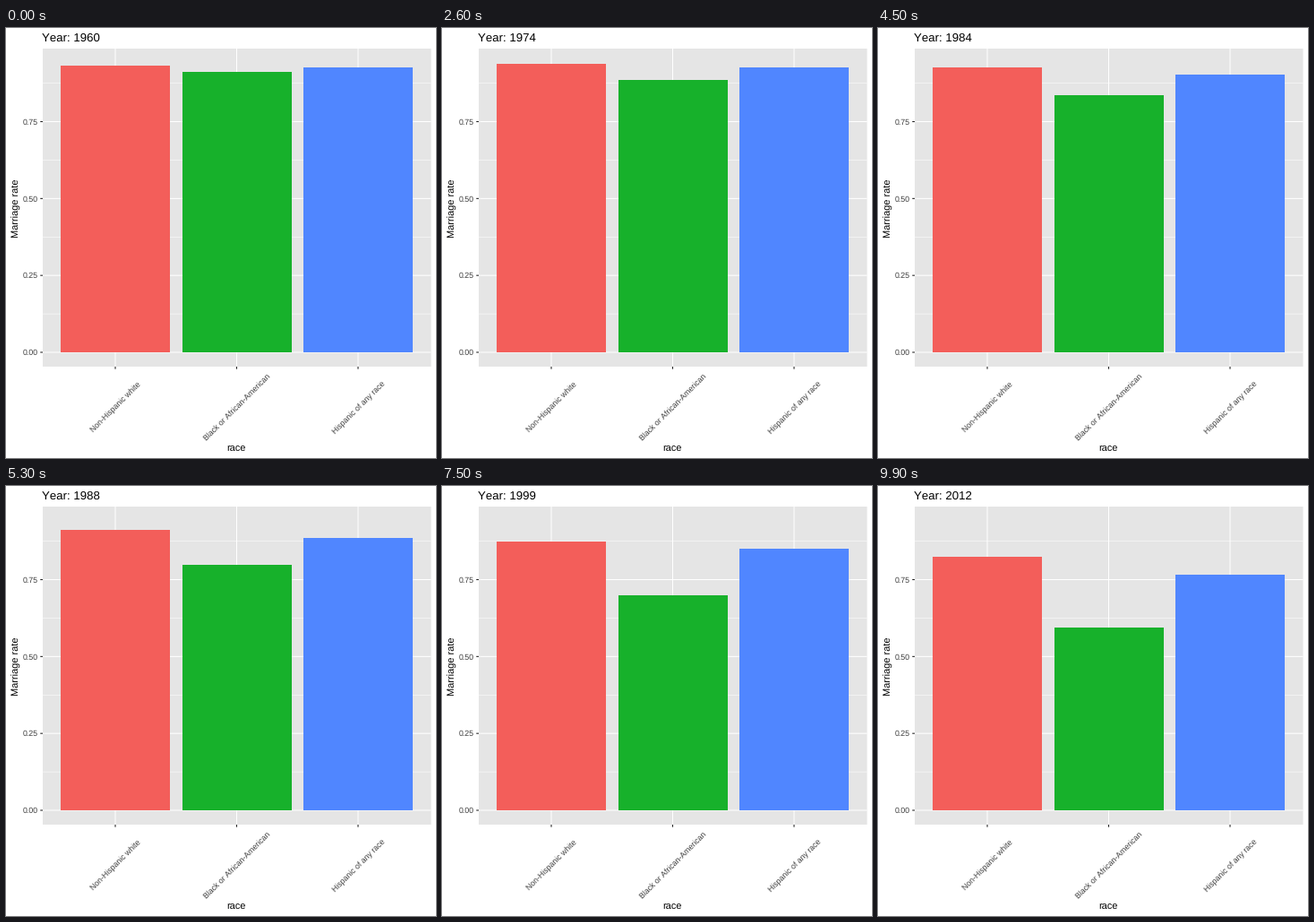
Write a matplotlib script that moves like this. It is 480 px wide and 480 px high and loops after 10000 ms.

```python
import matplotlib.pyplot as plt
import numpy as np
from matplotlib.animation import FuncAnimation
from matplotlib.patches import Rectangle

SIZE, DPI = 480, 72
FRAMES, INTERVAL = 100, 100
FIRST_YEAR, LAST_YEAR = 1960, 2012

plt.rcParams.update({
    "font.family": "Liberation Sans",
    "text.hinting": "none",
    "text.kerning_factor": 6,
})

# Panel geometry in pixels, y pointing down
LEFT, RIGHT, TOP, BOTTOM = 41, 474.5, 23, 378
ZERO, UNIT = 362, 343.3
MIDDLE, PITCH, BAR_WIDTH = 257.5, 135.5, 122

PANEL, TEXT, TICK = "#e5e5e5", "#3c3c3c", "#262626"

# label, colour, and the rate at the years where its trend bends
GROUPS = [
    ("Non-Hispanic white", "#f35e5a",
     {1960: .932, 1980: .940, 1990: .904, 2005: .856, 2012: .824}),
    ("Black or African-American", "#17b12b",
     {1960: .912, 1970: .897, 1980: .867, 2000: .694, 2005: .678,
      2008: .620, 2012: .594}),
    ("Hispanic of any race", "#5086ff",
     {1960: .9265, 1970: .930, 1980: .919, 1990: .875, 2005: .837,
      2012: .766}),
]

fig = plt.figure(figsize=(SIZE / DPI, SIZE / DPI), dpi=DPI, facecolor="white")
ax = fig.add_axes([0, 0, 1, 1])
ax.set_xlim(0, SIZE)
ax.set_ylim(SIZE, 0)
ax.axis("off")


def line(xs, ys, color="white", width=1.07):
    ax.plot(xs, ys, color=color, lw=width, solid_capstyle="butt",
            snap=False, zorder=2)


def label(x, y, text, size, color="black", **kwargs):
    return ax.text(x, y, text, fontsize=size, color=color, zorder=4, **kwargs)


def box(x, y, width, height, color, zorder, **kwargs):
    return ax.add_patch(Rectangle((x, y), width, height, facecolor=color,
                                  linewidth=0, zorder=zorder, **kwargs))


box(LEFT, TOP, RIGHT - LEFT, BOTTOM - TOP, PANEL, 1, snap=False)

for rate in np.arange(0, 1, 0.25):
    y = ZERO - rate * UNIT
    minor = y - UNIT / 8
    line((LEFT, RIGHT), (minor, minor), width=0.53)
    line((LEFT, RIGHT), (y, y))
    line((LEFT - 2.74, LEFT), (y, y), TICK)
    label(36, y + 3.2, f"{rate:.2f}", 8.8, TEXT, ha="right")

bars = []
for k, (name, color, _) in enumerate(GROUPS):
    x = MIDDLE + (k - 1) * PITCH
    line((x, x), (TOP, BOTTOM))
    line((x, x), (BOTTOM, BOTTOM + 2.74), TICK)
    label(x + 1, 423.6, name, 8.8, TEXT, rotation=45,
          ha="center", va="center")
    left = np.floor(x + 0.5) - BAR_WIDTH / 2
    bars.append(box(left, ZERO, BAR_WIDTH, 0, color, 3, antialiased=False))

label(256.8, 473, "race", 11, ha="center")
label(12, 201.5, "Marriage rate", 11, rotation=90, ha="center", va="center")
title = label(40.4, 15, "", 13.2)


def update(i):
    year = FIRST_YEAR + (LAST_YEAR - FIRST_YEAR) * i / (FRAMES - 1)
    title.set_text(f"Year: {round(year)}")
    for bar, (_, _, trend) in zip(bars, GROUPS):
        rate = np.interp(year, list(trend), list(trend.values()))
        top = round(ZERO - rate * UNIT)
        bar.set_y(top)
        bar.set_height(ZERO - top)
    return [title, *bars]


anim = FuncAnimation(fig, update, frames=FRAMES, interval=INTERVAL,
                     repeat=True, repeat_delay=0, blit=False)
plt.show()
```
